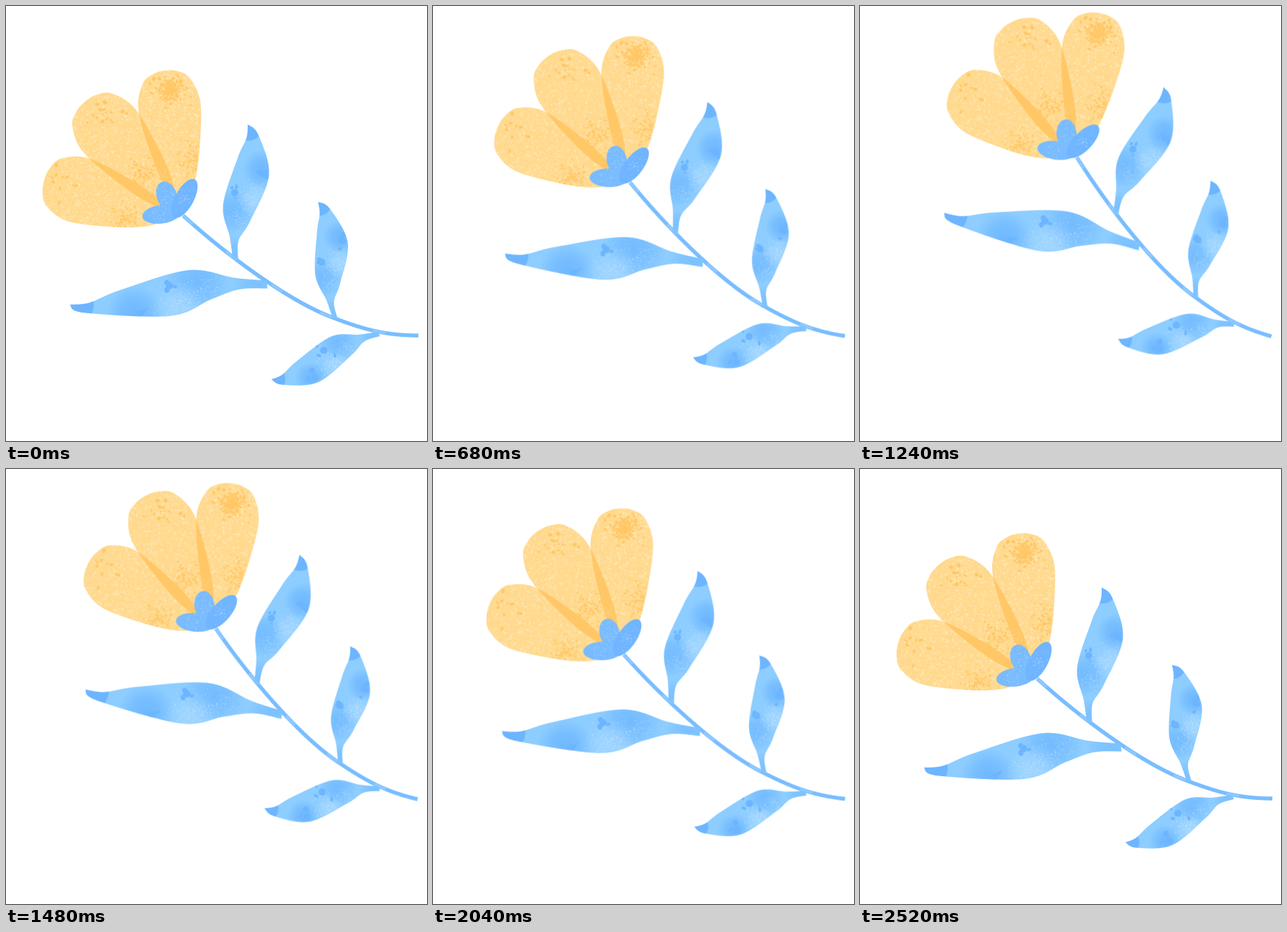
These frames come from a looping animation (587 by 606 pixels, 2560 ms). An HTML page with a canvas:

```html
<!DOCTYPE html>
<html lang="en">
<head>
<meta charset="utf-8">
<title>Swaying flower</title>
<style>
  html, body { margin: 0; width: 100%; height: 100%; overflow: hidden; background: #fff; }
  #stage { position: relative; width: 100%; height: 100%; overflow: hidden; contain: strict; }
  canvas {
    position: absolute; left: 0; top: 0; width: 587px; height: 606px;
    transform-origin: 570px 454.5px;
    animation: sway 2560ms infinite;
  }
  /* constant speed both ways, drawn at 25 pictures per second */
  @keyframes sway {
    0% { transform: rotate(0deg); animation-timing-function: steps(31, end); }
    48.4375% { transform: rotate(15.6deg); animation-timing-function: steps(1, end); }
    50% { transform: rotate(15.75deg); animation-timing-function: steps(31, end); }
    98.4375%, 100% { transform: rotate(0deg); }
  }
</style>
</head>
<body>
<div id="stage"><canvas id="flower" width="1174" height="1212"></canvas></div>
<script>
const ctx = document.getElementById('flower').getContext('2d');
ctx.scale(2, 2);

const SUN = '#ffd98e', SUN_DARK = '#ffc766', SUN_LIGHT = '#ffebbf';
const SKY = '#8dcdff', SKY_DARK = '#6db5ff', SKY_LIGHT = '#bfe2ff';

let seed = 11;
const rnd = () => (seed = (seed * 16807) % 2147483647) / 2147483647;
const bell = () => (rnd() + rnd() + rnd()) * 2 / 3 - 1;
const span = (a, b) => a + (b - a) * rnd();

// Maps u (along) and v (to the right) onto the stage
function frame(x, y, angle, length, width) {
  const c = Math.cos(angle), s = Math.sin(angle);
  return (u, v) => [x + u * length * c - v * width * s, y + u * length * s + v * width * c];
}

// Smooth curve through all points
function spline(path, pts) {
  const get = i => pts[Math.max(0, Math.min(pts.length - 1, i))];
  path.lineTo(...pts[0]);
  for (let i = 0; i < pts.length - 1; i++) {
    const [a, b, c, d] = [get(i - 1), get(i), get(i + 1), get(i + 2)];
    path.bezierCurveTo(b[0] + (c[0] - a[0]) / 6, b[1] + (c[1] - a[1]) / 6,
      c[0] - (d[0] - b[0]) / 6, c[1] - (d[1] - b[1]) / 6, ...c);
  }
}

function within(paths, draw) {
  ctx.save();
  paths.forEach(p => ctx.clip(p));
  draw();
  ctx.restore();
}

function fill(path, color) {
  ctx.fillStyle = color;
  ctx.fill(path);
}

function dot([x, y], r, color, ry = r, turn = 0) {
  ctx.fillStyle = color;
  ctx.beginPath();
  ctx.ellipse(x, y, r, ry, turn, 0, 7);
  ctx.fill();
}

// Soft round stain
function wash([x, y], r, rgb, alpha) {
  const g = ctx.createRadialGradient(x, y, 0, x, y, r);
  g.addColorStop(0, `rgba(${rgb},${alpha})`);
  g.addColorStop(0.5, `rgba(${rgb},${alpha * 0.7})`);
  g.addColorStop(1, `rgba(${rgb},0)`);
  dot([x, y], r, g);
}

// Specks at places chosen by a rule
function specks(count, size, color, alpha, place) {
  ctx.globalAlpha = alpha;
  for (let i = 0; i < count; i++)
    dot(place(), size * span(0.3, 1), color, size * span(0.3, 0.9), rnd() * 3);
  ctx.globalAlpha = 1;
}

const cloud = ([x, y], r) => () => [x + bell() * r, y + bell() * r];

// side: where the stain near the base lies; blotch: specks at the round end
function petal(deg, length, width, side, blotch) {
  const at = frame(249, 300, deg * Math.PI / 180, length, width);
  const half = [[0.08, 0], [0.25, 0.49], [0.5, 0.82], [0.77, 1], [0.93, 0.76], [0.985, 0.4], [1, 0]];
  const mirror = half.slice(0, -1).reverse().map(([u, v]) => [u, -v]);
  const path = new Path2D();
  path.moveTo(...at(...half[0]));
  spline(path, [...half, ...mirror].map(p => at(...p)));

  const anywhere = () => at(span(0.1, 1), span(-1, 1));
  fill(path, SUN);
  within([path], () => {
    specks(900, 1.9, SUN_LIGHT, 0.5, anywhere);
    specks(250, 1.3, '#ffcf78', 0.45, anywhere);
    specks(110, 2, SUN_DARK, 0.8, cloud(at(0.4, side * 0.5), 33));
    specks(blotch, 2.8, SUN_DARK, 0.85, cloud(at(0.87, 0.1), 24));
    specks(9, 3.6, SUN_DARK, 1, () => at(span(0.75, 0.96), span(-0.9, 0.9)));
  });
  return path;
}

// bulge and hollow: depth of both edges; peak: where the bulge is deepest
function leaf(x, y, tipX, tipY, bulge, hollow, peak, flip) {
  const length = Math.hypot(tipX - x, tipY - y);
  const at = frame(x, y, Math.atan2(tipY - y, tipX - x), length, length * flip);
  const outer = [[0, 0.02], [0.14, 0.01], [0.29, bulge * 0.43], [peak, bulge], [0.93, bulge * 0.45], [1, 0]];
  const inner = [[1, 0], [0.9, 0], [0.74, -hollow * 0.42], [0.39, -hollow], [0.16, -hollow * 0.45], [0, -0.02]];
  const path = new Path2D();
  path.moveTo(...at(0, 0));
  spline(path, outer.map(p => at(...p)));
  spline(path, inner.map(p => at(...p)));

  const deep = '92,171,255', pale = '178,222,255';
  fill(path, SKY);
  within([path], () => {
    wash(at(0.35, -hollow * 0.5), length * 0.16, deep, 0.5);
    wash(at(0.68, bulge * 0.7), length * 0.14, deep, 0.6);
    wash(at(0.45, bulge * 0.6), length * 0.13, pale, 0.5);
    wash(at(0.05, 0), length * 0.12, deep, 0.35);
    specks(length, 1.1, SKY_LIGHT, 0.6, cloud(at(0.45, bulge * 0.5), length * 0.17));
    specks(length / 2, 1, SKY_LIGHT, 0.45, cloud(at(0.3, 0), length * 0.13));
    dot(at(1, 0), length * 0.12, SKY_DARK);
    for (const spot of [at(0.49, -hollow * 0.4), at(0.65, bulge * 0.75)]) {
      dot(spot, 5, SKY_DARK);
      specks(4, 4.5, SKY_DARK, 1, cloud(spot, 17));
    }
  });
}

const left = petal(196.5, 204, 46, -1, 5);
const mid = petal(230.3, 217, 47, 0, 12);
const right = petal(262.5, 212, 43.5, 1, 130);

// Neighbouring petals show darker where they overlap
for (const [side, count] of [[left, 15], [right, 55]])
  within([side, mid], () => {
    fill(mid, SUN_DARK);
    specks(count, 1.3, SUN, 0.6, cloud([225, 235], 32));
  });

ctx.lineWidth = 5.4;
ctx.strokeStyle = '#79bdff';
const stem = new Path2D('M247 292 C300 340 390 410 458 435 C500 451 530 459 575 459');
ctx.stroke(stem);
within([], () => {
  ctx.lineWidth = 3.4;
  ctx.strokeStyle = '#a5d5ff';
  ctx.globalAlpha = 0.5;
  ctx.setLineDash([18, 60]);
  ctx.stroke(stem);
});

leaf(320, 353, 337, 165, 0.19, 0.127, 0.64, 1);
leaf(459, 435, 435, 273, 0.2, 0.113, 0.62, 1);
leaf(364, 388, 89, 416, 0.108, 0.112, 0.5, -1);
leaf(520, 457, 370, 520, 0.178, 0.139, 0.64, -1);

// Calyx: three oval lobes
const lobe = (x, y, long, wide, deg, color) => {
  const path = new Path2D();
  path.ellipse(x, y, long, wide, deg * Math.PI / 180, 0, 7);
  fill(path, color);
  within([path], () => specks(80, 1, SKY_LIGHT, 0.45, cloud([x, y], 26)));
};
lobe(224, 264, 20, 14, 70, '#79bbff');
lobe(217, 290, 27, 13, -8, '#79bbff');
lobe(249, 268, 30, 13, -62, '#70b5ff');
</script>
</body>
</html>
```
